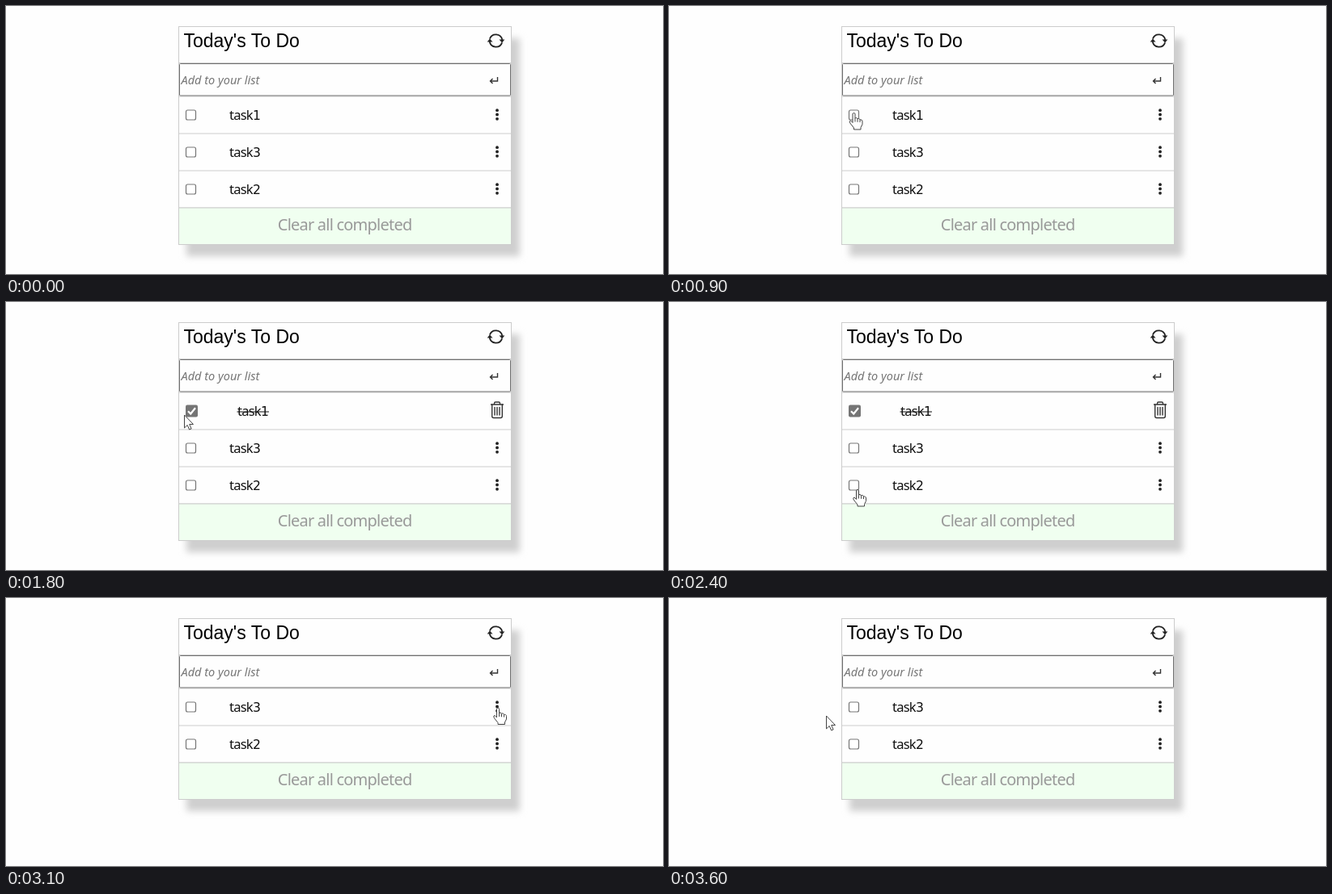
Recreate the animation shown at these times as an HTML page. Size 812x332 px, loop 3.7 s.

```html
<!DOCTYPE html>
<html lang="en">
<head>
<meta charset="utf-8">
<title>To-do list</title>
<style>
  html, body { margin: 0; width: 100%; height: 100%; overflow: hidden; background: #fefefe; }
  svg { display: block; width: 812px; height: 332px; font-family: "Noto Sans", "Open Sans", sans-serif; }
  .title { font: 23px "Liberation Sans", Arial, sans-serif; }
  .hint { font-size: 14.5px; font-style: italic; fill: #757575; }
  .task { font-size: 16.5px; letter-spacing: -.75px; fill: #111; }
  .digit { font: 15.5px "DejaVu Sans", sans-serif; letter-spacing: 0; }
  .clear { font-size: 20px; letter-spacing: -.78px; fill: #999; text-anchor: middle; }
  .line { fill: none; stroke: #ccc; }
  .ink { fill: none; stroke: #333; stroke-width: 1.4; }
  .cursor { fill: #fff; stroke: #444; stroke-linejoin: round; }
</style>
</head>
<body>
<svg viewBox="0 0 812 332">
  <defs>
    <filter id="blur" x="-10%" y="-15%" width="120%" height="130%">
      <feGaussianBlur stdDeviation="4"/>
    </filter>
    <g id="turn">
      <path d="M-7.6 -2.4A8 8 0 0 1 7.8 -1" fill="none" stroke="#222" stroke-width="1.8"/>
      <path d="M4 -1.6H10.8L7.6 2.6Z" fill="#222"/>
    </g>
    <g id="dots" fill="#222">
      <circle cy="-5.3" r="1.9"/><circle r="1.9"/><circle cy="5.3" r="1.9"/>
    </g>
    <g id="trash" class="ink" stroke-linecap="round">
      <path d="M-7.5 -7.5H7.5M-3.5 -7.5V-9Q-3.5 -10.5 -2 -10.5H2Q3.5 -10.5 3.5 -9V-7.5"/>
      <path d="M-6.3 -7.5V7Q-6.3 9 -4.3 9H4.3Q6.3 9 6.3 7V-7.5M-3 -4V5.5M0 -4V5.5M3 -4V5.5"/>
    </g>
  </defs>

  <rect id="shadow" x="223" y="40" width="412" fill="#cfcfcf" filter="url(#blur)"/>
  <rect id="card" x="213.5" y="25.5" width="411" fill="#fefefe" stroke="#ccc"/>

  <text class="title" x="219.5" y="51">Today's To Do</text>
  <g transform="translate(605.5 43)">
    <use href="#turn"/><use href="#turn" transform="rotate(180)"/>
  </g>

  <path class="line" d="M214 70.5H624M214 112H624"/>
  <rect x="214.5" y="71.5" width="409" height="39.5" rx="1" fill="#fefefe" stroke="#707070"/>
  <text class="hint" x="216.5" y="97">Add to your list</text>
  <path class="ink" d="M607.5 88V93H598.5M601.5 90L598.5 93L601.5 96"/>

  <g id="rows"></g>
  <g id="footer">
    <rect x="214" width="410" height="45" fill="#f0fff0"/>
    <path class="line" d="M214 0H624"/>
    <text class="clear" x="418.6" y="28">Clear all completed</text>
  </g>

  <g id="cursor" class="cursor">
    <path id="arrow" d="M0 0V16L3.7 12.5L6.1 18L8.6 17L6.2 11.5H11Z"/>
    <g id="hand">
      <path d="M-1.5 12V1.5Q-1.5 0 0 0T1.5 1.5V7Q1.7 5.8 3 6T4.5 7.5Q5 6.6 6.2 7T7.5 8.7Q8.5 8 9.5 8.6T10.5 10.5V14L8.5 18V20.5H0V18.5L-4 13.5Q-6 11 -5 10T-2.8 10.5Z"/>
      <path fill="none" d="M1.5 7V11M4.5 7.5V11.3M7.5 8.7V11.6"/>
    </g>
  </g>
</svg>
<script>
const LOOP = 3700, STEP = 100, TOP = 112, ROW = 46;
const APPEAR = 400, CHECK = 1300, REMOVE = 3100;
const START = [330, 290];

// Each move: first step, last step, place reached.
const MOVES = [
  [400, 900, 228.5, 132.5],
  [1700, 1800, 220.5, 140],
  [2000, 2100, 224, 190],
  [2300, 2400, 233, 232.5],
  [2700, 2900, 608, 136],
  [3200, 3600, 194.5, 146]
];
const HAND_TIMES = [[800, 1700], [2400, 2700], [2900, 3200]];

const $ = id => document.getElementById(id);
const show = (id, on) => $(id).setAttribute("display", on ? "inline" : "none");
const place = (id, x, y) => $(id).setAttribute("transform", `translate(${x} ${y})`);

function rowMarkup(num, done, i) {
  const box = done
    ? `<rect x="222" y="15.5" width="15" height="15" rx="2" fill="#757575"/>
       <path d="M225 23.3L228.2 26.5L234 19.3" fill="none" stroke="#fff" stroke-width="2.2"/>`
    : `<rect x="222.5" y="17" width="12" height="12" rx="2" fill="#fff" stroke="#767676" stroke-width="1.2"/>`;
  const x = done ? 286 : 276;
  const strike = done ? `<path d="M285.5 24H325" stroke="#111" stroke-width="1.2"/>` : "";
  return `<g transform="translate(0 ${TOP + i * ROW})">
    <path class="line" d="M214 46H624"/>${box}
    <text class="task" x="${x}" y="29">task<tspan class="digit">${num}</tspan></text>${strike}
    <use href="#${done ? "trash" : "dots"}" x="607" y="22.5"/></g>`;
}

function cursorAt(t) {
  let [x, y] = START;
  for (const [from, to, nx, ny] of MOVES) {
    if (t < from) break;
    const p = Math.min(1, (t - from + STEP) / (to - from + STEP));
    x += (nx - x) * p;
    y += (ny - y) * p;
  }
  return [x, y];
}

let lastState = "";
function drawList(t) {
  const done = t >= CHECK;
  const nums = t >= REMOVE ? [3, 2] : [1, 3, 2];
  const state = nums + ":" + done;
  if (state === lastState) return;
  lastState = state;
  const end = TOP + nums.length * ROW;
  $("rows").innerHTML = nums.map((n, i) => rowMarkup(n, done && n === 1, i)).join("");
  place("footer", 0, end);
  $("card").setAttribute("height", end + 20);
  $("shadow").setAttribute("height", end + 20);
}

function draw(now) {
  const t = Math.floor((now % LOOP) / STEP) * STEP;
  drawList(t);
  const hand = HAND_TIMES.some(([a, b]) => t >= a && t < b);
  show("cursor", t >= APPEAR);
  show("hand", hand);
  show("arrow", !hand);
  place("cursor", ...cursorAt(t));
}

const began = performance.now();
function tick() {
  draw(performance.now() - began);
  requestAnimationFrame(tick);
}
tick();
</script>
</body>
</html>
```
